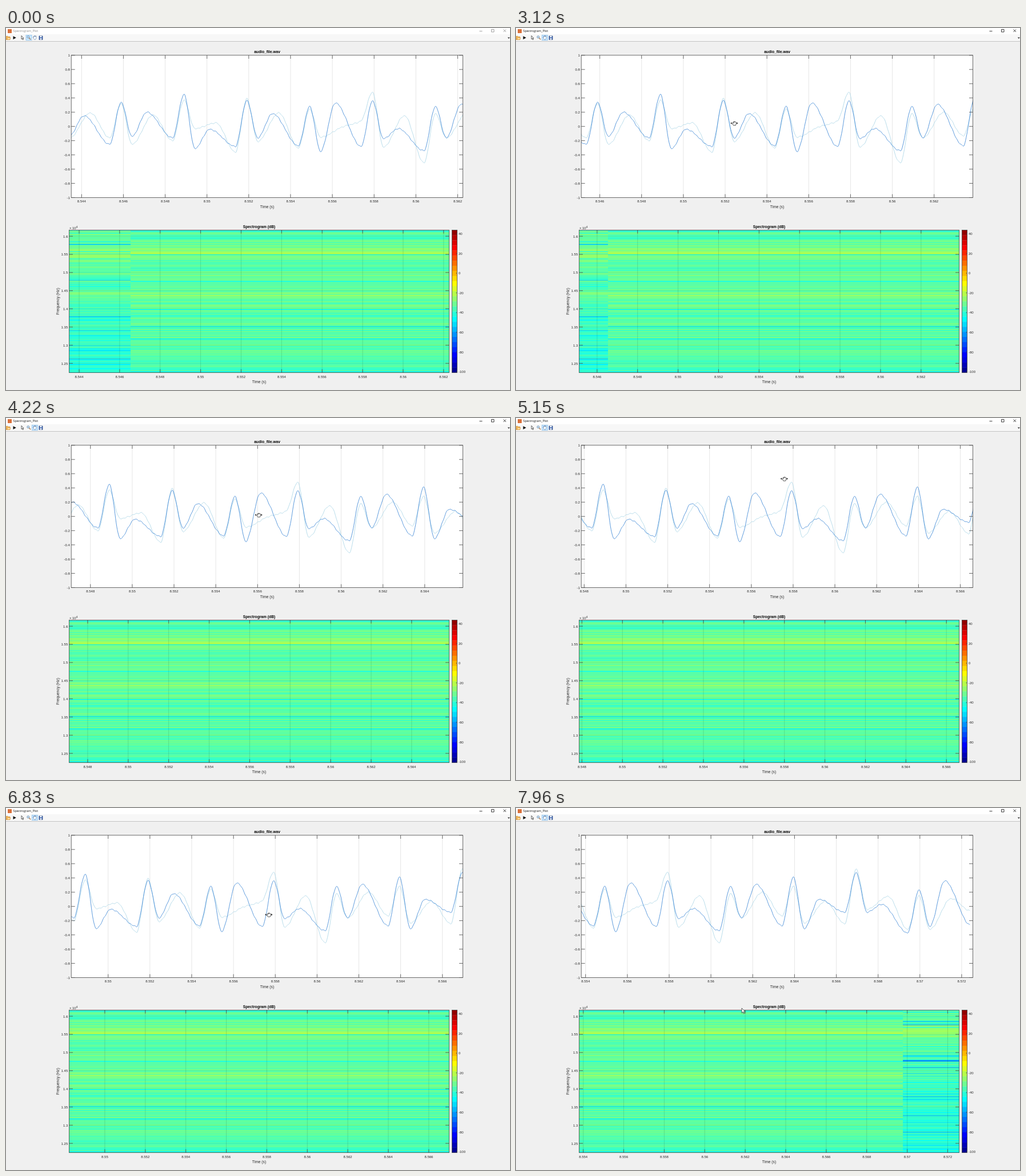
Recreate the animation shown at these times as an HTML page. Size 882x635 px, loop 8 s.

```html
<!DOCTYPE html>
<html lang="en">
<head>
<meta charset="utf-8">
<title>Spectrogram_Plot</title>
<style>
  html, body { margin: 0; width: 100%; height: 100%; overflow: hidden; background: #f0f0f0; }
  svg { display: block; width: 882px; height: 635px; }
  text { font-family: "Liberation Sans", Arial, sans-serif; fill: #262626; }
</style>
</head>
<body>
<svg id="stage" viewBox="0 0 882 635">
  <defs>
    <clipPath id="topClip"><rect x="114" y="47" width="686" height="251"/></clipPath>
    <clipPath id="botClip"><rect x="110" y="354" width="666" height="251"/></clipPath>
  </defs>
  <rect width="882" height="635" fill="#f0f0f0"/>
  <rect width="882" height="11" fill="#fff"/>
  <rect y="11" width="882" height="12" fill="#f7f7f7"/>
  <rect y="23" width="882" height="1" fill="#c4c4c4"/>

  <rect x="3" y="2" width="7" height="7" fill="#d9703a"/>
  <g id="caption">
    <text x="12.5" y="6.9" style="font:5.3px 'Open Sans',sans-serif;fill:currentColor">Spectrogram_Plot</text>
    <path d="M828.5 5.5h5M849.5 2.5h4.5v4.500h-4.500zM870.5 2.5l4.500 4.500m0-4.500l-4.500 4.500" fill="none" stroke="currentColor" stroke-width=".8"/>
  </g>

  <rect id="lit" y="12.5" width="10" height="9" fill="#cce8ff" stroke="#90c4ee" stroke-width=".8"/>
  <path d="M.5 20.5v-6h2.500l1 1h3v5z" fill="#f5b95a" stroke="#c98324" stroke-width=".7"/>
  <path d="M1.5 20.5l1.500-3.500h5l-1.500 3.500z" fill="#ffe0a0" stroke="#c98324" stroke-width=".5"/>
  <path d="M12.5 14.3v5.600l5.300-2.800z" fill="#111"/>
  <path d="M27 13.5v6l1.400-1.200 1 2.300 1-.5-1-2.100h1.700z" fill="#fff" stroke="#222" stroke-width=".7"/>
  <circle cx="38.8" cy="15.8" r="1.9" fill="#dff1ff" stroke="#3f6f9c" stroke-width=".8"/>
  <path d="M40.3 17.3l2.800 2.900" stroke="#a0622d" stroke-width="1.2"/>
  <path d="M48 17.5l-1-1.500.8-.5.8 1v-2.300l1-.3.4 1.500.2-2 1 .1.2 1.900.6-1.500.9.3v3.300l-1.200 2.700h-2.300z" fill="#fff" stroke="#4b6f9c" stroke-width=".6"/>
  <path d="M58 14h6v6.500h-6z" fill="#3f66b0" stroke="#22407c" stroke-width=".7"/>
  <path d="M59.5 14h3v2.400h-3zM59.5 18h3v2.500h-3z" fill="#fff"/>
  <path d="M877.8 16.5h4l-2 2.300z" fill="#222"/>

  <rect x="114" y="48" width="685.5" height="249.5" fill="#fff"/>
  <g clip-path="url(#topClip)"><g id="topPan"></g></g>
  <g clip-path="url(#botClip)"><g id="botPan"></g></g>
  <g id="frame"></g>
  <g id="labels"></g>

  <path id="arrow" d="M0 0v8.500l2-1.800 1.400 3 1.300-.6-1.400-2.900h2.700z" fill="#fff" stroke="#222" stroke-width=".7"/>
  <g id="hand">
    <path d="M-6.500 0l2.200-1.800v3.600zM6.500 0l-2.200-1.800v3.600z" fill="#111"/>
    <path d="M-1.500 3.800l-1.700-3.200.6-.9 1 .6-.5-2.300.9-.4.7 1 .3-1.600h.9l.4 1.300.7-1 .8.6.8 1.500-.3 2.200-.7 2.200z" fill="#fff" stroke="#111" stroke-width=".7"/>
  </g>
</svg>
<script>
const LOOP = 8000, BOT_RATIO = 0.9694;
const $ = id => document.getElementById(id);

function add(parent, tag, attrs, text) {
  const el = document.createElementNS("http://www.w3.org/2000/svg", tag);
  for (const k in attrs) el.setAttribute(k, attrs[k]);
  if (text !== undefined) el.textContent = text;
  parent.append(el);
  return el;
}
const label = (x, y, text, anchor = "middle", size = 6, more = {}) =>
  add($("labels"), "text", { x, y, "text-anchor": anchor, "font-size": size, ...more }, text);
const line = (parent, d, stroke, width = 0.8) =>
  add(parent, "path", { d, stroke, "stroke-width": width, fill: "none" });

// Jet colour map, v from 0 to 1
function jet(v) {
  const part = c => Math.round(255 * Math.max(0, Math.min(1, 1.5 - Math.abs(4 * v - c))));
  return `rgb(${part(3)},${part(2)},${part(1)})`;
}
function random(seed) {
  return () => (seed = (seed * 16807) % 2147483647) / 2147483647;
}
const bell = (y, mid, width) => Math.exp(-(((y - mid) / width) ** 2));

// A voiced sound: one row per pitch period, in percent: peak, dip, bump, low
const PERIOD = 110, FIRST = 91.5;
const left = { bump: 45, color: "#4a8fd8", rows: [
  [0, -14, 15, -25], [34, -14, 20, -16], [45, -31, -4, -28], [36, -16, 18, -27], [28, -35, 33, -28],
  [36, -17, -3, -34], [28, -16, 31, -27], [41, -31, 10, -8], [47, -8, 3, -37], [23, -28, 36, -26]] };
const right = { bump: 56, color: "#b0d8e8", rows: [
  [0, -17, 19, -16], [32, -25, 16, -20], [37, -3, 5, -36], [39, -21, 19, -30], [24, -15, -1, 8],
  [48, -29, 15, -51], [18, -16, 20, -13], [28, -23, 7, -24], [52, -4, 14, -32], [15, -32, 11, -6]] };

// Monotone cubic through the key levels, with a faint ripple
function wave({ rows, bump }) {
  const phase = [0, 19, bump, 90];
  const pts = rows.flatMap((row, n) =>
    row.map((v, k) => [FIRST + PERIOD * n + phase[k], 172.7 - 1.25 * v]));
  const rise = i => (pts[i + 1][1] - pts[i][1]) / (pts[i + 1][0] - pts[i][0]);
  const slope = i => {
    if (i < 1 || i > pts.length - 2) return 0;
    const a = rise(i - 1), b = rise(i);
    return a * b <= 0 ? 0 : 2 * a * b / (a + b);
  };
  let d = "M";
  for (let i = 0; i < pts.length - 1; i++) {
    const [x0, y0] = pts[i], [x1, y1] = pts[i + 1], w = x1 - x0;
    for (let x = x0; x < x1; x++) {
      const u = (x - x0) / w, q = 1 - u;
      const y = y0 * q * q * (1 + 2 * u) + y1 * u * u * (3 - 2 * u)
        + w * u * q * (slope(i) * q - slope(i + 1) * u)
        + 0.7 * Math.sin(x * 0.8) + 0.4 * Math.sin(x * 0.47 + 1);
      d += `${x.toFixed(1)} ${y.toFixed(1)} `;
    }
  }
  return d;
}

// Spectrum blocks: smooth hills, a fall towards low rows, noise and thin notches
const blocks = [
  { from: 90, to: 218, seed: 71, fall: 0.06, notch: 0.2 },
  { from: 218, to: 1041.7, seed: 907, fall: 0.015, notch: 0.12 },
  { from: 1041.7, to: 1180, seed: 3301, fall: 0.06, notch: 0.2 },
];
for (const { from, to, seed, fall, notch } of blocks) {
  const rnd = random(seed);
  for (let y = 355; y < 605; y++) {
    const v = 0.475 + 0.06 * bell(y, 394, 10) + 0.035 * bell(y, 468, 10)
      - fall * (y - 355) / 250 + 0.07 * (rnd() - 0.5) - notch * rnd() ** 12;
    add($("botPan"), "rect", { x: from, y, width: to - from, height: 1, fill: jet(v), "shape-rendering": "crispEdges" });
  }
}

// Time grid, ticks and their labels
const INK = "#484848";
const ticks = [];
const axes = [
  { pan: $("topPan"), ratio: 1, x0: 132.3, step: 73.13, lo: 114, hi: 800, top: 48, end: 297.5, text: 306.3, grid: "#e6e6e6" },
  { pan: $("botPan"), ratio: BOT_RATIO, x0: 128, step: 70.87, lo: 110, hi: 776, top: 354.5, end: 604.5, text: 613.6, grid: "rgba(0,0,0,.13)" },
];
for (const axis of axes) {
  for (let k = 0; k < 15; k++) {
    const x = axis.x0 + axis.step * k;
    line(axis.pan, `M${x} ${axis.top}V${axis.end}`, axis.grid, 1);
    line(axis.pan, `M${x} ${axis.top}v6M${x} ${axis.end}v-6`, INK);
    ticks.push({ x, axis, el: label(x, axis.text, String(+(8.544 + 0.002 * k).toFixed(3))) });
  }
}
for (const channel of [right, left]) line($("topPan"), wave(channel), channel.color, 0.9);

const box = (x, y, width, height) =>
  add($("frame"), "rect", { x, y, width, height, fill: "none", stroke: INK, "stroke-width": 0.8 });
const sideTicks = (y, x1, x2) => line($("frame"), `M${x1} ${y}h6.5M${x2} ${y}h-6.5`, INK);

box(114.2, 47.8, 685.3, 249.7);
for (let k = 0; k <= 10; k++) {
  const y = 47.8 + 24.97 * k;
  sideTicks(y, 114.2, 799.5);
  label(111.8, y + 2.4, String(+(1 - 0.2 * k).toFixed(1)), "end");
}
for (let k = 0; k < 8; k++) {
  const y = 365.2 + 31.86 * k;
  line($("frame"), `M111 ${y}H775`, "rgba(0,0,0,.09)");
  sideTicks(y, 110.5, 775.5);
  label(108.3, y + 2.3, String(+(1.6 - 0.05 * k).toFixed(2)), "end");
}
box(110.5, 354.5, 665, 250);

// Colour bar
const LEVELS = 28, barStep = 250 / LEVELS;
for (let k = 0; k < LEVELS; k++)
  add($("frame"), "rect", { x: 780.5, y: 354.5 + k * barStep, width: 9, height: barStep + 0.3, fill: jet(1 - (k + 0.5) / LEVELS) });
box(780.5, 354.5, 9, 250);
for (let k = 0; k < 8; k++) {
  const y = 361 + 34.55 * k;
  line($("frame"), `M789.5 ${y}h-2`, INK);
  label(792, y + 2.2, String(40 - 20 * k), "start");
}

const bold = { "font-weight": "bold", style: "fill:#000" };
label(457, 44.4, "audio_file.wav", "middle", 6.7, bold);
label(443, 351.2, "Spectrogram (dB)", "middle", 6.7, bold);
label(457, 315.6, "Time (s)", "middle", 6.7);
label(443, 623, "Time (s)", "middle", 6.7);
label(0, 0, "Frequency (Hz)", "middle", 6.8, { transform: "translate(92.5 479.5) rotate(-90)" });
label(111, 353.3, "×", "start");
label(116, 353.3, "10", "start");
label(122.7, 350.5, "4", "start", 4.6);

// Motion: [ms, value ...]
const pan = [[2540, 0], [3120, 58.7], [3920, 130.8], [4840, 130.8], [5150, 159.2],
  [5630, 182], [6830, 172.8], [7960, 376.2]];
const mouse = [[70, 538, 440], [830, 48, 11], [980, 48, 15], [1470, 48, 15], [2130, 449.5, 167],
  [2540, 449.5, 167], [3120, 382, 167], [3920, 319, 170], [4050, 319, 170], [4220, 442, 170],
  [4820, 508, 144], [5150, 469.5, 106.5], [5630, 438, 122], [6830, 460, 187], [7550, 295, 285], [7960, 395, 351]];

function at(table, t) {
  const i = table.findIndex(key => t < key[0]);
  if (i < 1) return table.at(i).slice(1);
  const [t0, ...a] = table[i - 1], [t1, ...b] = table[i];
  return a.map((v, k) => v + (b[k] - v) * (t - t0) / (t1 - t0));
}
const show = (el, on) => el.setAttribute("visibility", on ? "visible" : "hidden");

function draw(t) {
  const [off] = at(pan, t), [x, y] = at(mouse, t);
  for (const { pan, ratio } of axes)
    pan.setAttribute("transform", `translate(${(-off * ratio).toFixed(2)} 0)`);
  for (const { el, x, axis } of ticks) {
    const px = x - off * axis.ratio;
    el.setAttribute("x", px.toFixed(1));
    show(el, px >= axis.lo && px <= axis.hi);
  }
  $("caption").setAttribute("color", t < 1320 ? "#8c8c8c" : "#111");
  $("lit").setAttribute("x", t < 1520 ? 35 : 45.5);
  const inside = t >= 1520 && x > 114 && x < 800 && y > 48 && y < 298;
  show($("hand"), inside);
  show($("arrow"), t >= 70 && !inside);
  $(inside ? "hand" : "arrow").setAttribute("transform", `translate(${x.toFixed(1)} ${y.toFixed(1)})`);
}

const start = performance.now();
function tick() {
  draw((performance.now() - start) % LOOP);
  requestAnimationFrame(tick);
}
tick();
</script>
</body>
</html>
```
